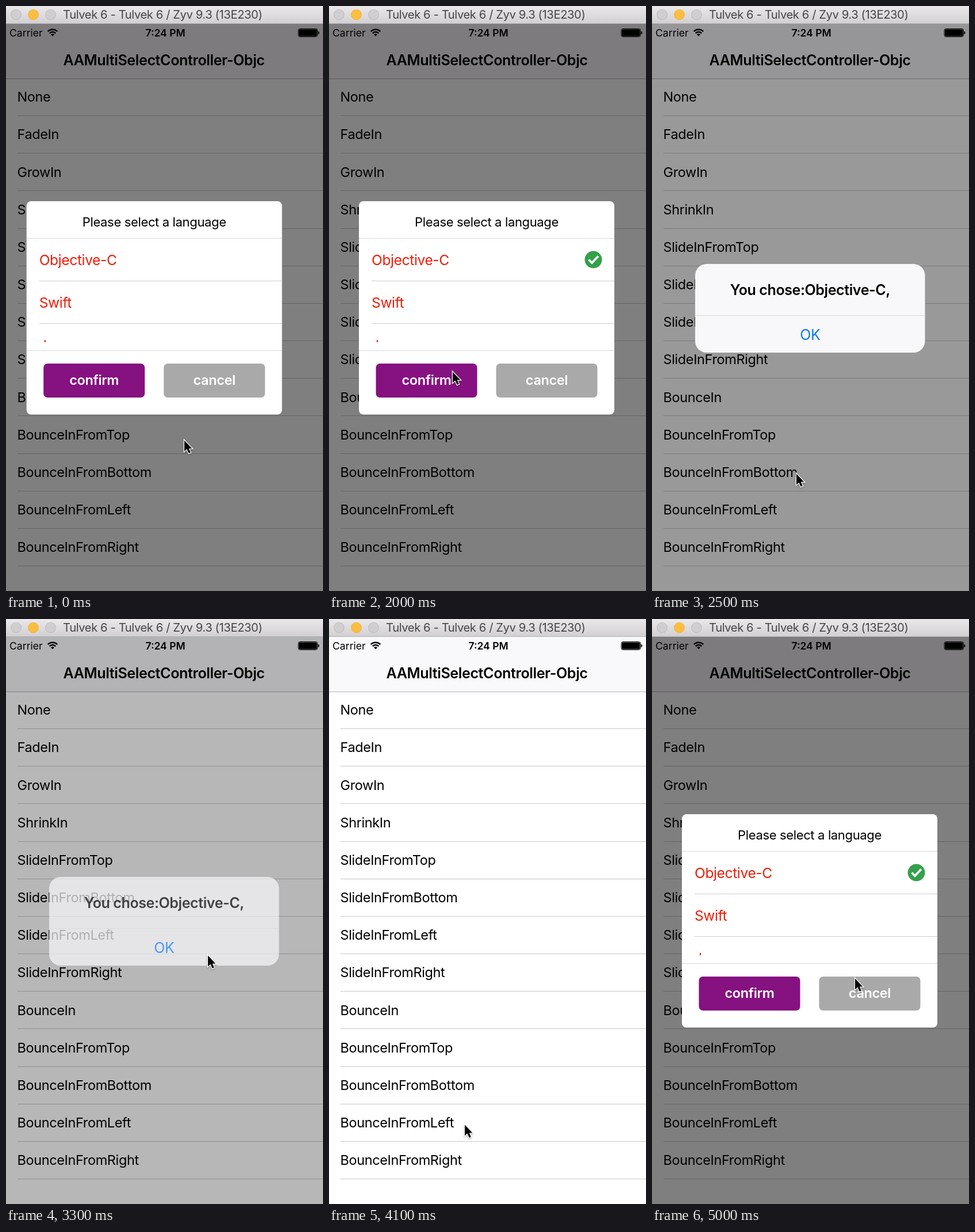
Recreate the animation shown at these times as an HTML page with a canvas. Size 551 by 1016 pixels, loop 5100 ms.

```html
<!DOCTYPE html>
<html lang="en">
<head>
<meta charset="utf-8">
<title>Multi select popup</title>
<style>
html, body { margin: 0; width: 100%; height: 100%; overflow: hidden; background: #fff; }
canvas { display: block; }
</style>
</head>
<body>
<canvas id="stage" width="551" height="1016"></canvas>
<script>
const W = 551, H = 1016, LOOP = 5100, STEP = 100;
const g = document.getElementById('stage').getContext('2d');

const ROWS = ['None', 'FadeIn', 'GrowIn', 'ShrinkIn', 'SlideInFromTop', 'SlideInFromBottom',
  'SlideInFromLeft', 'SlideInFromRight', 'BounceIn', 'BounceInFromTop', 'BounceInFromBottom',
  'BounceInFromLeft', 'BounceInFromRight'];
const ROW_TOP = 125.3, ROW_H = 65.17;

// Pointer stops: time, x, y
const PATH = [
  [0, 309, 753], [200, 309, 753], [600, 300, 651], [1100, 262, 448], [1400, 260, 450],
  [1800, 214, 634], [2100, 214, 634], [2500, 250, 811], [2600, 262, 850], [2700, 270, 845],
  [3100, 350, 583], [3500, 350, 583], [4000, 235, 877], [4300, 235, 877], [4800, 352, 623],
  [LOOP, 352, 623]
];

const clamp = v => Math.max(0, Math.min(1, v));
const ramp = (t, from, to) => clamp((t - from) / (to - from));
const smooth = v => v * v * (3 - 2 * v);
const easeOut = v => 1 - (1 - v) ** 3;

// Share of the way still to go, for a spring with damping 0.8 and a fast start
function spring(ms) {
  const s = Math.max(0, ms / 1000);
  return Math.exp(-11.5 * s) * (Math.cos(8.64 * s) - 0.4 * Math.sin(8.64 * s));
}

function settle(ms) {
  const s = Math.max(0, ms) * 0.0107;
  return (1 + s) * Math.exp(-s);
}

function rect(x, y, w, h, color) {
  g.fillStyle = color;
  g.fillRect(x, y, w, h);
}

function panel(x, y, w, h, r, color) {
  g.fillStyle = color;
  g.beginPath();
  g.roundRect(x, y, w, h, r);
  g.fill();
}

function disc(x, y, r, color) {
  g.fillStyle = color;
  g.beginPath();
  g.arc(x, y, r, 0, 7);
  g.fill();
}

function text(str, x, y, size, color = '#000', { weight = 400, align = 'left', track = -0.016 } = {}) {
  g.font = `${weight} ${size}px Inter, Roboto, sans-serif`;
  g.letterSpacing = `${track * size}px`;
  g.textAlign = align;
  g.fillStyle = color;
  g.fillText(str, x, y);
}

function titleBar() {
  const fill = g.createLinearGradient(0, 0, 0, 30);
  fill.addColorStop(0, '#eae8ea');
  fill.addColorStop(1, '#d2d0d2');
  rect(0, 0, W, 30, fill);
  rect(0, 30, W, 1, '#b3b1b3');
  const lights = [['#bab8ba', '#d0ced1'], ['#f0b23c', '#fdbd3f'], ['#bab8ba', '#d0ced1']];
  lights.forEach(([edge, color], i) => {
    disc(17.5 + 30 * i, 15, 9.3, edge);
    disc(17.5 + 30 * i, 15, 8.4, color);
  });
  text('Tulvek 6 - Tulvek 6 / Zyv 9.3 (13E230)', 99, 22, 20.2, '#474547', { track: -0.02 });
}

function wifi() {
  const x = 81, y = 52.5;
  g.strokeStyle = '#000';
  g.lineWidth = 2.5;
  for (const r of [7.4, 11.8]) {
    g.beginPath();
    g.arc(x, y, r, -Math.PI * 0.75, -Math.PI * 0.25);
    g.stroke();
  }
  g.fillStyle = '#000';
  g.beginPath();
  g.moveTo(x, y);
  g.arc(x, y, 4.2, -Math.PI * 0.75, -Math.PI * 0.25);
  g.fill();
}

function battery() {
  g.strokeStyle = '#000';
  g.lineWidth = 1;
  g.beginPath();
  g.roundRect(508, 39.5, 33.5, 14, 3);
  g.stroke();
  panel(509, 40.5, 31.5, 12, 2, '#000');
  panel(542.5, 44, 2, 5, [0, 2, 2, 0], '#000');
}

function navBar() {
  rect(0, 31, W, 95, '#f9f8fa');
  rect(0, 126, W, 1, '#b4b2b5');
  text('Carrier', 6, 53, 17.6, '#000', { track: 0 });
  wifi();
  text('7:24 PM', 277, 53, 17.5, '#000', { weight: 600, align: 'center', track: 0 });
  battery();
  text('AAMultiSelectController-Objc', 274.5, 102.5, 25.1, '#000', { weight: 600, align: 'center' });
}

function list(glow) {
  rect(0, 127, W, H - 127, '#fff');
  if (glow > 0) {
    g.globalAlpha = glow;
    rect(0, 842, W, 66, '#d9d9d9');
    g.globalAlpha = 1;
  }
  ROWS.forEach((name, i) => {
    const line = Math.round(ROW_TOP + ROW_H * (i + 1) - 0.4);
    rect(20, line, W - 20, 1, '#c9c7cb');
    text(name, 19.5, ROW_TOP + ROW_H * i + 41, 23.5);
  });
}

function tick(x, y) {
  disc(x, y, 15, '#35a04c');
  g.strokeStyle = '#fff';
  g.lineWidth = 3.8;
  g.beginPath();
  g.moveTo(x - 8, y);
  g.lineTo(x - 2.5, y + 5.5);
  g.lineTo(x + 8.5, y - 6);
  g.stroke();
}

function button(label, x, color) {
  panel(x, 621, 176, 59, 7, color);
  text(label, x + 88, 658, 23.5, '#fff', { weight: 600, align: 'center' });
}

function popup(x, alpha, checked) {
  if (alpha <= 0) return;
  const red = '#ee1d08', line = '#dadada';
  g.save();
  g.globalAlpha = alpha;
  g.translate(x, 0);
  panel(0, 339, 444, 370.5, 8, '#fff');
  text('Please select a language', 222, 383, 22, '#000', { align: 'center' });
  rect(0, 403, 444, 1, line);
  text('Objective-C', 22, 449.5, 24.6, red);
  rect(22, 477, 422, 1, '#cfcdd1');
  text('Swift', 22, 523.5, 24.6, red);
  rect(22, 551, 422, 1, '#cfcdd1');
  rect(31, 580, 2, 4, red);
  rect(0, 598, 444, 1, line);
  button('confirm', 29.5, '#861180');
  button('cancel', 238.5, '#a9a9a9');
  if (checked) tick(407.5, 440.5);
  g.restore();
}

function alertBox(alpha, scale) {
  if (alpha < 0.005) return;
  g.save();
  g.globalAlpha = alpha;
  g.translate(274.8, 525);
  g.scale(scale, scale);
  g.translate(-274.8, -525);
  panel(75, 448, 399.5, 154, 20, '#f8f7f9');
  rect(75, 537, 399.5, 1, '#d6d5d8');
  text('You chose:Objective-C,', 274.8, 501.5, 25, '#000', { weight: 600, align: 'center' });
  text('OK', 274.8, 579.5, 25, '#0b7af0', { align: 'center' });
  g.restore();
}

function dim(amount) {
  if (amount > 0) rect(0, 31, W, H - 31, `rgba(2, 0, 3, ${amount})`);
}

function pointer(t) {
  const i = PATH.findIndex((p, k) => k > 0 && t <= p[0]);
  const [t0, x0, y0] = PATH[i - 1], [t1, x1, y1] = PATH[i];
  const k = smooth(ramp(t, t0, t1));
  g.save();
  g.translate(x0 + (x1 - x0) * k + 1, y0 + (y1 - y0) * k + 1.5);
  g.scale(0.86, 0.86);
  g.beginPath();
  [[0, 0], [0, 22], [5, 17.5], [9, 26], [12.6, 24.4], [9, 16.2], [15.5, 16.2]]
    .forEach(([x, y]) => g.lineTo(x, y));
  g.closePath();
  g.lineWidth = 3;
  g.strokeStyle = '#fff';
  g.shadowColor = 'rgba(0, 0, 0, 0.3)';
  g.shadowBlur = 3;
  g.shadowOffsetY = 1.5;
  g.stroke();
  g.shadowColor = 'transparent';
  g.fillStyle = '#000';
  g.fill();
  g.restore();
}

function draw(t) {
  const again = t >= 4200;
  const shown = again ? ramp(t, 4200, 4300) : 1 - ramp(t, 2050, 2250);
  const x = again ? 52 - 496 * spring(t - 4195) : 52 + 499 * spring(t + 160);
  const glow = again ? 1 - ramp(t, 4300, 4500) : 0;
  const rise = easeOut(ramp(t, 2100, 2450));
  const alertAlpha = t < 3200 ? rise : again ? 0 : settle(t - 3200);

  titleBar();
  navBar();
  list(glow);
  dim(shown * 0.5);
  popup(x, shown, t >= 1300);
  dim(alertAlpha * 0.4);
  alertBox(alertAlpha, 1.2 - 0.2 * rise);
  pointer(t);
}

// The screen advances in steps of a tenth of a second
function frame() {
  const t = performance.now() % LOOP;
  draw(Math.floor(t / STEP) * STEP);
  requestAnimationFrame(frame);
}
frame();
</script>
</body>
</html>
```
